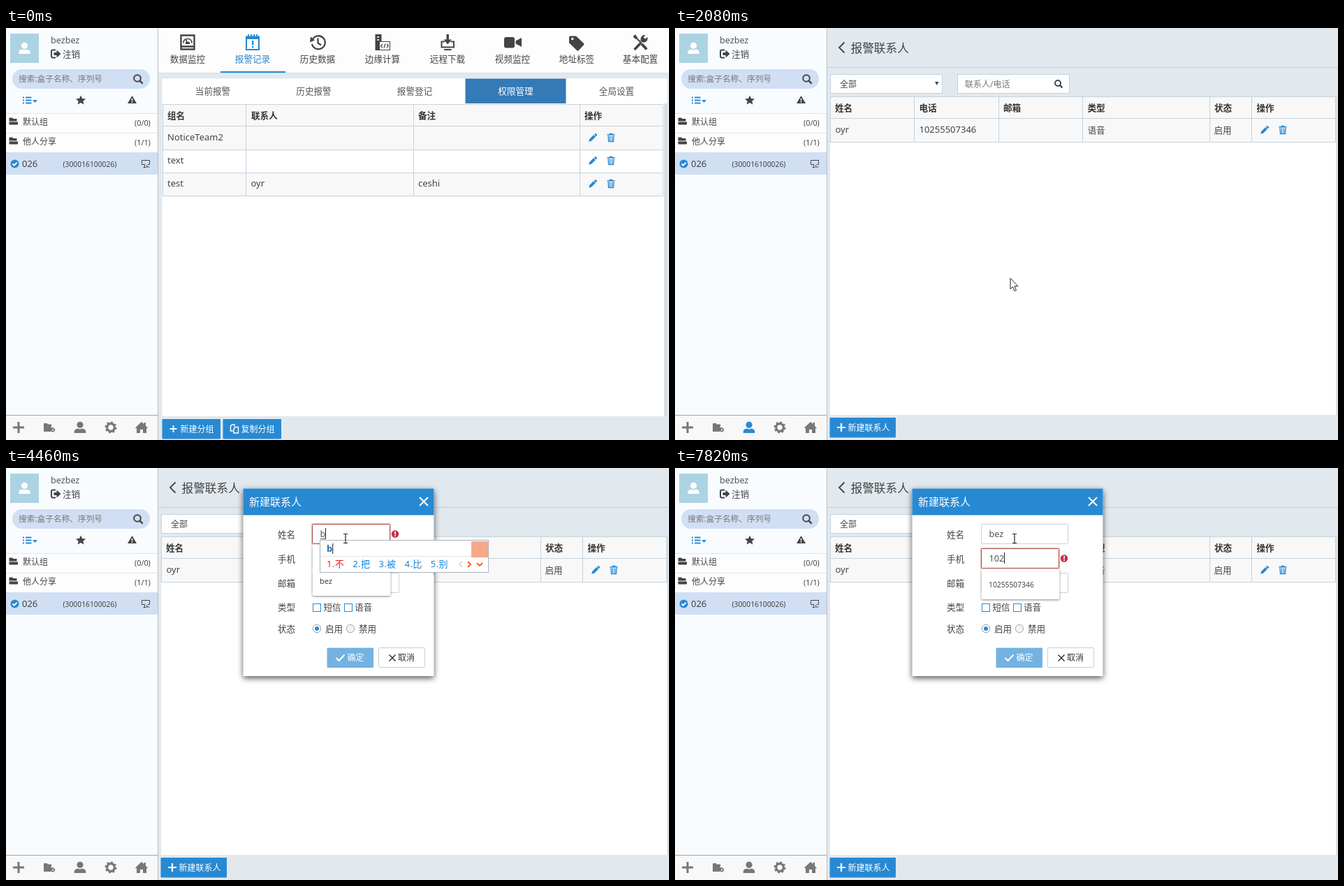
An HTML page for the animation above (8 s loop, 949 px wide and 590 px high).

```html
<!DOCTYPE html>
<html lang="zh">
<head>
<meta charset="utf-8">
<style>
html, body { margin: 0; width: 100%; height: 100%; overflow: hidden; }
svg { display: block; width: 100%; height: 100%; font-family: "Noto Sans", "Noto Sans CJK SC", sans-serif; }
text { white-space: pre; }
</style>
</head>
<body>
<svg viewBox="0 0 949 590"></svg>
<script>
const LOOP = 8000;
const blue = '#2889d3', ink = '#444', line = '#c3d3e0', grey = '#777', pale = '#f8f8f8', back = '#e2e9ee';
const user = 'bezbez', name = 'bez', contact = 'oyr', phone = '10255507346';

// Drawing helpers: each returns SVG markup
const text = (x, y, s, size = 12.6, fill = ink, more = '') =>
  `<text x="${x}" y="${y}" font-size="${size}" fill="${fill}" ${more}>${s}</text>`;
const mid = (x, y, s, fill, size) => text(x, y, s, size, fill, 'text-anchor="middle"');
const bold = (x, y, s) => text(x, y, s, 12.6, '#333', 'font-weight="700"');
const rect = (x, y, w, h, fill, r = 0) =>
  `<rect x="${x}" y="${y}" width="${w}" height="${h}" fill="${fill}" rx="${r}"/>`;
const box = (x, y, w, h, stroke, fill = '#fff', r = 0) =>
  `<rect x="${x + .5}" y="${y + .5}" width="${w - 1}" height="${h - 1}" fill="${fill}" stroke="${stroke}" rx="${r}"/>`;
const fillPath = (d, fill = ink) => `<path d="${d}" fill="${fill}" fill-rule="evenodd"/>`;
const stroke = (d, color = ink, w = 2) => `<path d="${d}" fill="none" stroke="${color}" stroke-width="${w}"/>`;
const dot = (x, y, r, fill, more = '') => `<circle cx="${x}" cy="${y}" r="${r}" fill="${fill}" ${more}/>`;
const at = (x, y, s) => `<g transform="translate(${x} ${y})">${s}</g>`;
const shadow = (s, y, blur, color) => `<g style="filter:drop-shadow(0 ${y}px ${blur}px ${color})">${s}</g>`;

// Icons
const person = (x, y, fill) => at(x, y, dot(0, -3.7, 4.6, fill) +
  fillPath('M-8.2 8V5.5Q-8 2.5-3.5 1.5Q0 3.5 3.5 1.5Q8 2.5 8.2 5.5V8z', fill));
const plus = (x, y, r, color, w) => stroke(`M${x - r} ${y}h${2 * r}M${x} ${y - r}v${2 * r}`, color, w);
const lens = (x, y, r, w) => dot(x, y, r, 'none', `stroke="${ink}" stroke-width="${w}"`) +
  stroke(`M${x + r * .7} ${y + r * .7}l${r * .9} ${r * .9}`, ink, w + .6);
const folder = (x, y, fill = ink) => fillPath(`M${x} ${y + 5}V${y + 1}q0-1 1-1h3.5l1.5 1.5h5v3.5zM${x} ${y + 6}h12.5v3q0 1-1 1h-10.5q-1 0-1-1z`, fill);
const cog = (x, y, r, w) => dot(x, y, r, 'none', `stroke="${grey}" stroke-width="${w}"`) +
  dot(x, y, r * 1.4, 'none', `stroke="${grey}" stroke-width="${w * .7}" stroke-dasharray="${r * 1.4 * Math.PI / 8}"`);
const pencil = (x, y) => at(x, y, fillPath('M-5.8 5.8l1-3.8 6-6 2.8 2.8-6 6zM1.9-4.6l1-1q1-.8 1.9.1l.9.9q.9.9.1 1.9l-1 1z', blue));
const trash = (x, y) => at(x, y, fillPath('M-5.5-5h3.2v-1.3h4.6v1.3h3.2v1.5h-11z', blue) +
  stroke('M-4-3l.6 8.5h6.8l.6-8.5M-1.5-2.5v7M1.5-2.5v7', blue, 1.4));
const tools = (x, y) => pencil(x, y) + trash(x + 26, y);
const cross = (x, y, r, color, w) => stroke(`M${x - r} ${y - r}l${2 * r} ${2 * r}m0 ${-2 * r}l${-2 * r} ${2 * r}`, color, w);

function table(xs, ys, fills) {
  const w = xs.at(-1) - xs[0], h = ys.at(-1) - ys[0];
  return fills.map((f, i) => rect(xs[0], ys[i], w, ys[i + 1] - ys[i], f)).join('') +
    stroke(xs.map(x => `M${x + .5} ${ys[0]}v${h + 1}`).join('') +
      ys.map(y => `M${xs[0]} ${y + .5}h${w + 1}`).join(''), line, 1);
}

const sidebar = rect(0, 0, 217, 590, '#f8fcff') + rect(217, 0, 1, 590, '#b8c0c6') +
  rect(6, 8, 41, 42, '#acd3e3') + person(26.5, 29, '#fff') +
  text(64, 22, user, 12.6, '#555') +
  stroke('M71 31.5h-4q-2 0-2 2v7q0 2 2 2h4', ink, 2) + fillPath('M68.5 35h4v-3.5l6 5.5-6 5.5v-3.5h-4z') +
  text(81, 42, '注销') +
  rect(9, 59, 197, 28, '#d1dff4', 14) + text(18, 77, '搜索:盒子名称、序列号', 11.7, grey) + lens(188, 72, 4.8, 2) +
  stroke('M24 99.5h2m2 0h8.5M24 103.5h2m2 0h8.5M24 107.5h2m2 0h8.5', blue, 2) + fillPath('M38 103h7l-3.5 4z', blue) +
  fillPath('M107 96.5l2 4.5 5 .5-3.7 3.2 1.1 4.8-4.4-2.5-4.4 2.5 1.1-4.8-3.7-3.2 5-.5z') +
  fillPath('M180.5 97l6.5 11h-13zM179.6 101h1.8l-.3 3.500h-1.2zM179.7 105.3h1.6v1.5h-1.6z') +
  rect(0, 122, 217, 56, '#fdfdfd') + rect(0, 122, 217, 1, '#e2e6e8') + rect(0, 150, 217, 1, '#e2e6e8') +
  folder(4.5, 128.5) + text(24, 139, '默认组', 12) + text(184, 139.5, '(0/0)', 10.8) +
  folder(4.5, 156.5) + text(24, 167, '他人分享', 12) + text(184, 167.5, '(1/1)', 10.8) +
  rect(0, 178, 217, 32, '#d1dff4') + dot(12.5, 194.5, 6, blue) + stroke('M9.5 194.5l2.2 2.2 4-4', '#fff', 1.8) +
  text(23, 199, '026', 13) + text(81.5, 198.5, '(300016100026)', 10.3) +
  stroke('M199 195.5h-4.5v-6h11v6h-3M198.500 196v3.500M196.500 199.500h4M201.500 196.500v2.500h4', ink, 1) +
  rect(0, 554, 217, 36, pale) + rect(0, 554, 217, 1, '#a5a5a5') +
  plus(18, 572, 8, grey, 3) + folder(54, 566, grey) + rect(54, 570, 10, 8, grey) + cog(67, 575.5, 2, 1.5) +
  cog(150, 572, 5.3, 3.2) +
  fillPath('M185 572.5l9-8.5 3.5 3.3v-2.3h2.5v4.7l3 2.8-1 1-1-.9v7.4h-5v-5h-4v5h-5v-7.4l-1 .9z', grey);

const navIcons = [
  stroke('M250.5 10.5h19v20h-19zM251 26.5h18', ink, 2.4) + stroke('M254 21.5q0-6 6-6t6 6M260 21l-2.5-4', ink, 1.6) + rect(257, 20, 6, 3, ink),
  stroke('M344 12.5h18v18.5h-18z', blue, 2) + rect(343, 12, 20, 4, blue) + stroke('M347 9v4M351 9v4M355 9v4M359 9v4', blue, 1.8) + rect(352, 18, 2.4, 6.5, blue) + rect(352, 26, 2.4, 2.4, blue),
  stroke('M438 23a9.5 9.5 0 1 0 1-7M446.5 14.5v7l4.5 3', ink, 2.3) + fillPath('M435 20.5l1-8 6 5z'),
  rect(528.5, 9, 9, 23, ink) + stroke('M531 13h3M531 17h3', '#fff', 1.3) + box(534, 19, 16, 13, ink) +
    stroke('M539 23l-2.5 2.5 2.5 2.5M545 23l2.5 2.5-2.5 2.5M543 22.5l-2 6', ink, 1.2),
  stroke('M628 19.5h-4.5v8h17.5v-8h-4.5M627 31h10.5', ink, 2) + rect(630.5, 9, 3.4, 9, ink) + fillPath('M626.5 16.5h11.5l-5.8 7z'),
  rect(713, 13, 15, 15.5, ink, 3) + fillPath('M729.5 18.5l8.5-4.5v13l-8.5-4.5z'),
  fillPath('M806 13q0-1.5 1.5-1.5h8.5l11 10.5q1 1.2 0 2.3l-7.5 8q-1 1-2.2 0l-11.3-11zM809 15.5a1.8 1.8 0 1 0 3.6 0a1.8 1.8 0 1 0-3.6 0z'),
  stroke('M899.5 31l10-10.5', ink, 3.6) + stroke('M910 23l7 7.5', ink, 4) + stroke('M901 13l7 7', ink, 2) +
    fillPath('M898 11l3-1.5 3 4-2.5 2.5-3-2zM908.5 19q-1-6 3-8.5 2-1 4-.4l-3 3.2 2.5 2.5 3-3q1.2 4-1.5 6.5-2.5 2-5 1.2z')
];
const nav = ['数据监控', '报警记录', '历史数据', '边缘计算', '远程下载', '视频监控', '地址标签', '基本配置'];
const navX = [260, 353, 446, 539, 632, 725, 817, 908];
const tabs = ['当前报警', '历史报警', '报警登记', '权限管理', '全局设置'];

const button = (x, y, w, s) => rect(x - .5, y, w + .5, 28.5, blue, 1) + text(x + 25.5, y + 18.5, s, 12, '#fff');

const groupsView = rect(218, 0, 731, 590, back) + rect(218, 0, 731, 64, '#fdfdfd') + rect(218, 64, 731, 1, '#d5dce1') +
  navIcons.join('') + nav.map((s, i) => mid(navX[i], 49, s, i == 1 ? blue : ink)).join('') + rect(307, 62, 93, 2, blue) +
  rect(223.5, 72.5, 723, 36, '#fff') + rect(657.5, 72.5, 144, 35.5, '#337ab7') +
  tabs.map((s, i) => mid(296 + i * 144.5, 95, s, i == 3 ? '#fff' : '#555')).join('') +
  rect(223.5, 108, 718.5, 448, '#fff') + rect(942, 108, 4, 448, '#d9dcde') +
  table([224, 343, 583, 821, 940], [109, 140, 174, 207, 240], [pale, pale, '#fff', pale]) +
  bold(231, 130, '组名') + bold(351, 130, '联系人') + bold(590, 130, '备注') + bold(828, 130, '操作') +
  ['NoticeTeam2', 'text', 'test'].map((s, i) => text(231, 161 + i * 33, s, 13) + tools(840, 157 + i * 33)).join('') +
  text(350.5, 227, contact, 13) + text(590, 227, 'ceshi', 13) +
  button(224, 560, 83, '新建分组') + plus(239.5, 574, 5, '#fff', 1.8) +
  button(311, 560, 83, '复制分组') + stroke('M325 577h-3.5v-7l2-2h3.5v3M326 580v-6l2.5-2.5h4v8.5z', '#fff', 1.4);

const contactsView = rect(218, 0, 731, 590, back) + rect(218, 56, 731, 1, '#c3ccd3') +
  stroke('M242.5 20.5l-7.5 7.5 7.5 7.5', ink, 1.8) + text(251.5, 35, '报警联系人', 16.7) +
  box(222, 66, 161, 28, line) + text(236, 84.5, '全部', 12) + fillPath('M372 77h5.5l-2.7 5z') +
  box(404, 66, 161, 28, line) + text(415, 84.5, '联系人/电话', 12, grey) + lens(548, 79, 4, 1.9) +
  rect(222, 98, 724, 456, '#fff') + rect(946, 98, 3, 456, '#dbe0e4') +
  table([222, 342, 463, 583, 765, 825, 945], [98, 129, 163], [pale, pale]) +
  ['姓名', '电话', '邮箱', '类型', '状态', '操作'].map((s, i) => bold([229, 349.5, 470, 590.5, 772, 832.5][i], 119, s)).join('') +
  text(229.5, 150, contact, 13) + text(349.5, 150, phone, 13) + text(590.5, 150.5, '语音') + text(771.5, 150.5, '启用') +
  tools(844, 146) + button(222, 558, 94, '新建联系人') + plus(238, 572, 6, '#fff', 2.2);

const dialogFrame = shadow(rect(339.5, 29.5, 273, 268.5, '#fff'), 3, 4, '#000a') + rect(339.5, 29.5, 273, 38, blue) +
  text(348, 53.5, '新建联系人', 15, '#fff') + cross(598, 48, 6, '#fff', 2) +
  ['姓名', '手机', '邮箱', '类型', '状态'].map((s, i) => text(389, [100, 135, 169.5, 204, 234.5][i], s)).join('') +
  box(439, 194, 12, 12, blue) + text(454.5, 204, '短信') + box(484, 194, 12, 12, blue) + text(499, 204, '语音') +
  dot(445, 230, 5.7, '#fff', 'stroke="#8aa0b0"') + dot(445, 230, 3, blue) + text(457, 234.5, '启用') +
  dot(493, 230, 5.7, '#f4f4f4', 'stroke="#aaa"') + text(505, 234.5, '禁用') +
  box(533, 257, 67, 29, '#ccc', '#fff', 1) + cross(553, 272, 4.5, '#333', 1.5) + text(561, 276, '取消', 12, '#333');

// 'bad' shrinks the field for the error badge, 'focus' adds a glow
function field(y, value, { bad, focus, caret, under } = {}) {
  const w = bad ? 112 : 125, edge = bad && focus ? '#a94442' : focus ? '#8fc1ea' : line;
  const width = value.length * 7.1;
  return (focus ? `<rect x="438" y="${y}" width="${w}" height="29" fill="none" stroke="${bad ? '#c77' : blue}" stroke-width="3" opacity=".3" rx="2"/>` : '') +
    box(438, y, w, 29, edge, '#fff', 1) + text(449.5, y + 19, value, 12.6, '#555') +
    (under ? rect(450, y + 21, width, 1, '#555') : '') +
    (caret ? rect(Math.round(449.5 + width), y + 6, 1, 16, '#222') : '') +
    (bad ? dot(557, y + 14.5, 5.2, '#c1304f') + rect(556.2, y + 11, 1.7, 4.3, '#fff') + rect(556.2, y + 16.2, 1.7, 1.7, '#fff') : '');
}

const menu = (y, h, items) => shadow(rect(438.5, y, 112, h, '#fff', 2), 1, 1.5, '#0007') + items;

function ime(word, words) {
  const step = 24.4 + 12.8 * words[0].length, right = Math.round(505 + step * 5);
  return box(449, 103, right - 449, 47, '#a9b4bd') + rect(450, 126, right - 451, 1, '#e3e3e3') +
    text(459, 120, word, 13, '#1c6fc4', 'font-weight="700"') + rect(459 + 8.2 * word.length, 108, 1, 15, '#222') +
    rect(right - 25, 105, 24, 23, '#f8a888') +
    words.map((s, i) => text(459 + i * step, 142, `${i + 1}.${s}`, 13, i ? '#1583d8' : '#e81c1c', 'letter-spacing=".4"')).join('') +
    stroke(`M${right - 38} 134l-4 4 4 4`, '#ccc', 1.3) + stroke(`M${right - 30} 134l4 4-4 4M${right - 17} 136l4 4 4-4`, '#f0592a', 1.8);
}

function dialog(t) {
  const onName = t >= 4090 && t < 5710, onPhone = t >= 5710;
  const typed = t < 4460 ? '' : name.slice(0, t < 4850 ? 1 : t < 5010 ? 2 : 3);
  const composing = t >= 4460 && t < 5410;
  const digits = phone.slice(0, t < 6950 ? 0 : t < 7350 ? 1 : t < 7820 ? 2 : 3);
  const badName = t < 5490, badPhone = t >= 7030;
  const caret = t < 6250 || t >= 6800;
  let s = dialogFrame + field(80, typed, { bad: badName, focus: onName, caret: onName, under: composing }) +
    field(115, digits, { bad: badPhone, focus: onPhone, caret: onPhone && caret }) + field(150, '') +
    rect(459.5, 257.5, 66.5, 28.5, t >= 5560 && t < 7120 ? blue : '#73b2e2', 1) +
    stroke('M472.5 272l4 4 8-8.5', '#fff', 2) + text(488.5, 276, '确定', 12, '#fff');
  if (t >= 4230 && t < 5410) s += menu(109, 74, text(449, 136, contact, 11) + text(449, 165.5, name, 11));
  if (t >= 7030) s += menu(144, 44, text(449, 170.5, phone, 10.3));
  if (composing) s += typed.length == 1 ? ime(typed, ['不', '把', '被', '比', '别'])
    : typed.length == 2 ? ime(typed, ['不饿', '本额', '变恶', '比额', '饱饿'])
    : ime(typed, ['不饿着', '别恶作', '把二字', '比二者', '变恶质']);
  return s;
}

// Pointer
const arrow = '<path d="M0 0v15.500l3.500-3.300 2.500 6 2.500-1-2.500-5.700h5z" fill="#fff" stroke="#222"/>';
const hand = '<path d="M-1.500 9v-7.500q0-1.500 1.500-1.500t1.500 1.500v5q2-.8 2.800.8 2-.6 2.600 1 2.300-.3 2.300 1.700v4q0 2.500-1.700 5h-7.500q-3-4.500-5.500-7.500-.5-2 1.500-1.800 1.500.5 2.500 2.300zM1.500 6.500v4M4.300 7.300v3.200M6.900 8.300v2.500" fill="#fff" stroke="#222"/>';
const beam = stroke('M-3-6.5h2.5l.5.5.5-.5h2.5M0-6v12M-3 6.5h2.5l.5-.5.5.5h2.5', '#222', 1.2);
const route = [[70, 728, 471], [840, 106, 563], [1220, 111, 570], [1700, 111, 570], [2310, 655, 258], [2390, 655, 258],
  [2770, 257, 553], [3080, 254, 572], [3231, 254, 572], [4000, 486, 101], [LOOP, 486, 101]];

function pointer(t) {
  if (t < 70) return '';
  const q = Math.max(70, Math.floor((t + 8) / 77) * 77);
  const i = Math.max(1, route.findIndex(k => k[0] > q));
  const [t0, x0, y0] = route[i - 1], [t1, x1, y1] = route[i];
  const u = (q - t0) / (t1 - t0), e = u * u * (3 - 2 * u);
  const shape = t >= 3920 ? beam : t >= 840 && t < 1770 ? hand : arrow;
  return at((x0 + (x1 - x0) * e).toFixed(1), (y0 + (y1 - y0) * e).toFixed(1), shape);
}

const statusBar = box(-2, 584, 318, 12, '#c9c9c9', '#fff', 3) + text(9, 598, 'http://demo.local/list', 12, '#555');

const scene = t => (t < 1540 ? groupsView : contactsView) + sidebar +
  person(106, 572, t >= 840 && t < 3080 ? blue : grey) +
  (t >= 920 && t < 2000 ? statusBar : '') + (t >= 3230 ? dialog(t) : '') + pointer(t);

const svg = document.querySelector('svg'), start = performance.now();
let last = '';
function draw() {
  const now = scene((performance.now() - start) % LOOP);
  if (now !== last) svg.innerHTML = last = now;
  requestAnimationFrame(draw);
}
draw();
</script>
</body>
</html>
```
